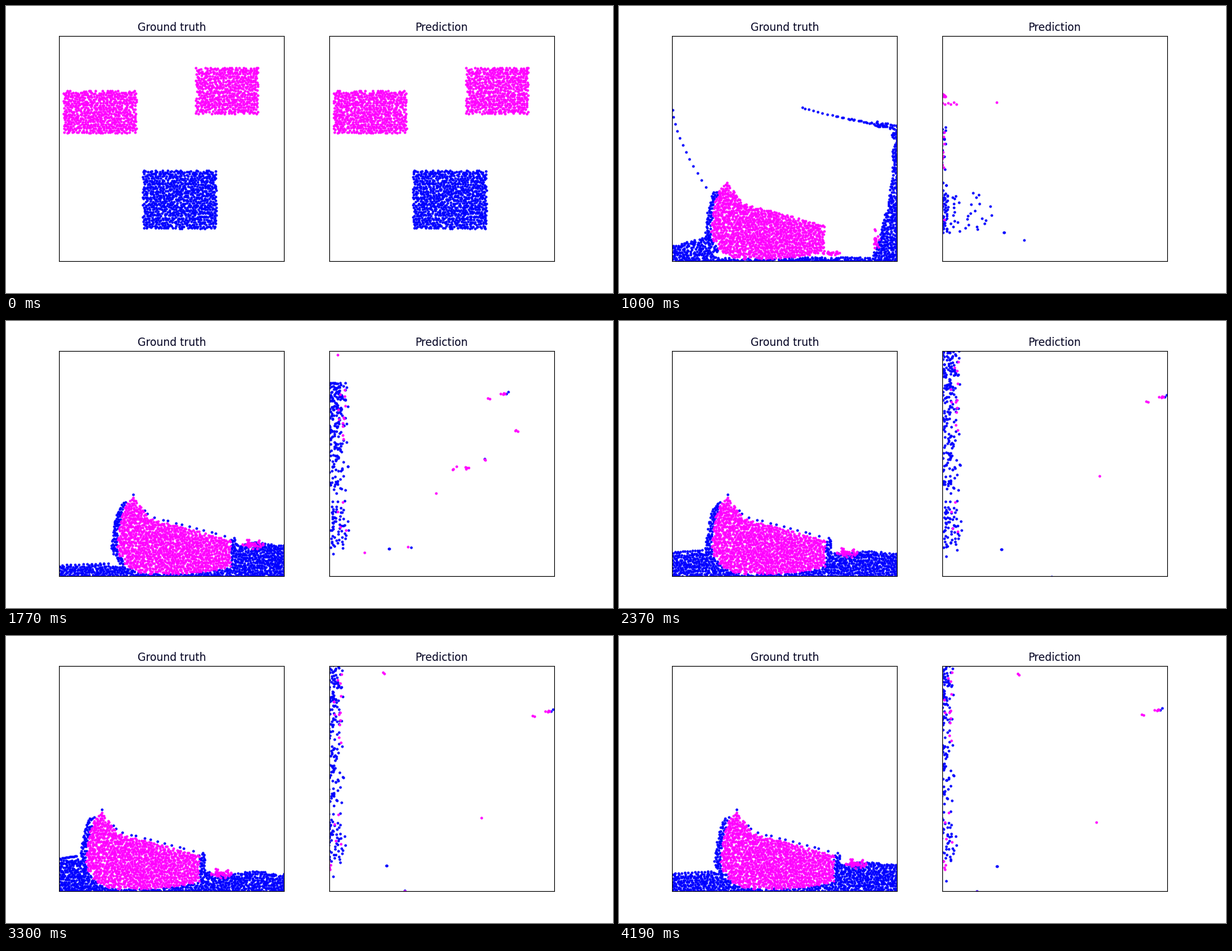
A matplotlib script that plays this animation: 950 by 450 pixels, repeating every 4230 ms.

```python
import numpy as np
import matplotlib.pyplot as plt
from matplotlib.animation import FuncAnimation

W, H, DPI = 950, 450, 100
LOOP, STEP = 4230, 30
BLUE, PINK, INK = "#0000ff", "#ff00ff", "#000020"
LEFT, TOP, WIDE, TALL = 83.2, 47.4, 352.27, 352.6
GAP = 422.7                 # distance between the two panels
WALL = LEFT + GAP           # left wall of the second panel
CALM = [1400, 1770, 2370, 2850, 3300, 3750, 4190]

rng = np.random.default_rng(4)


# ---------- helpers ----------

def fill(n, inside):
    """n evenly scattered points of the first panel where inside(x, y) holds."""
    s = 6.0
    while True:
        gx, gy = np.meshgrid(np.arange(84, 436, s), np.arange(48, 401, s * 0.866))
        gx[1::2] += s / 2
        pts = np.c_[gx.ravel(), gy.ravel()]
        pts += rng.uniform(-0.28, 0.28, pts.shape) * s
        pts = pts[inside(*pts.T)]
        if len(pts) >= n:
            return rng.permutation(pts)[:n]
        s *= 0.98


def rect(x0, y0, x1, y1):
    return lambda x, y: (x > x0) & (x < x1) & (y > y0) & (y < y1)


def shift(pts, dx, dy=0):
    return np.asarray(pts, float) + (dx, dy)


def columns(p, k=28):
    rank = np.argsort(np.argsort(p[:, 0]))
    return np.lexsort((p[:, 1], rank * k // len(p)))


def match(p, q):
    """Reorder q so that each point stays near its place in p."""
    out = np.empty_like(q)
    out[columns(p)] = q[columns(q)]
    return out


def track(*keys):
    """Smooth path without overshoot through (time, points) keys."""
    times = np.array([k[0] for k in keys], float)
    P = np.stack([np.asarray(k[1], float) for k in keys])
    d = np.diff(P, axis=0) / np.diff(times)[:, None, None]
    M = np.concatenate([d[:1], np.zeros_like(d[1:]), d[-1:]])
    a, b = d[:-1], d[1:]
    same = a * b > 0
    M[1:-1] = np.where(same, 2 * a * b / np.where(same, a + b, 1), 0)

    def at(t):
        t = np.clip(t, times[0], times[-1])
        i = min(np.searchsorted(times, t, "right") - 1, len(times) - 2)
        h = times[i + 1] - times[i]
        s = (t - times[i]) / h
        return (P[i] * (1 + 2 * s) * (1 - s) ** 2 + M[i] * h * s * (1 - s) ** 2
                + P[i + 1] * s * s * (3 - 2 * s) + M[i + 1] * h * s * s * (s - 1))
    return at


def drift(pts, *moves):
    return track(*[(t, shift(pts, dx, dy)) for t, dx, dy in moves])


def cluster(n, x, y, sx, sy=1):
    return np.c_[rng.normal(x, sx, n), rng.normal(y, sy, n)]


# ---------- shapes in the first panel ----------

def sway(t):
    """Sideways swing of the floating pile."""
    return 30 * np.exp(-((t - 1700) / 3300) ** 2) * np.cos(2 * np.pi * (t - 1700) / 2700)


def pile_top(s):
    return 297 + 46 * s - 28 * np.exp(-((s - 0.14) / 0.09) ** 2) + 60 * np.exp(-s / 0.03)


def in_pile(x, y, x0=144, w=178, lift=0):
    s = (x - x0) / w
    c = np.clip(s, 0, 1)
    bottom = 397 - 0.4 * lift - 40 * np.exp(-c / 0.08) - (12 + lift) * c ** 4
    return (s > 0) & (s < 1) & (y > pile_top(c) - lift) & (y < bottom)


def landed(x, y):
    return in_pile(x, y, 106, 171, 16)


def left_rim(x, y):
    return in_pile(x + 9, y) & ~in_pile(x, y) & (x < 156) & (y > 285)


def impact(x, y):
    return y > 400 - 80 * np.exp(-((x - 272) / 70) ** 4)


def splash(x, y):
    u = x - 84
    top = (392 - 57 * np.exp(-u / 25) - 36 * np.exp(-((x - 325) / 60) ** 2)
           - 75 * np.exp((x - 435) / 4))
    jet = (u < 28) & (y > 256 + u) & (y < 284 + 1.2 * u)
    rim = landed(x + 8, y) & (x < 112) & (y > 290)
    return ((y > top) | jet | rim) & ~landed(x, y)


def curl(x, y):
    """Water that climbs the right wall and folds over."""
    level = np.where(x < 150, 376 - 0.25 * (x - 84), 394)
    wall = (y > 190) & (x > 428 - 33 * ((y - 230) / 165) ** 2)
    lip = (x > 340) & (abs(y - stream(x)) < 1 + (x > 400) * 3)
    return (y > level) & ~in_pile(x, y) | left_rim(x, y) | wall | lip


def stream(x):
    return 158 + 32 * np.clip((x - 283) / 150, 0, 1) ** 0.8


def levels(dx):
    return 362 + 0.7 * dx, 362 - 0.45 * dx


def pool(dx):
    def inside(x, y):
        left, right = levels(dx)
        wave = 2 * np.sin(x / 13)
        px = x - dx
        rim = left_rim(px, y) | in_pile(px - 9, y) & (px > 322)
        return ((y > np.where(px < 240, left, right) + wave) | rim) & ~in_pile(px, y)
    return inside


# ---------- first panel ----------

block_a = fill(600, rect(90, 132.5, 204.5, 199.5))
block_b = fill(560, rect(297, 96.5, 394.5, 169))
water = fill(840, rect(214, 257.5, 329.5, 349))


def swing(pts, sinks=False):
    """Keys for points carried by the pile, or by the pool beside it."""
    return [(t, shift(pts, sway(t), levels(sway(t))[1] if sinks else 0)) for t in CALM]


def fall(pts, vx):
    return [(0, pts), (120, shift(pts, 0.21 * vx, 25)), (250, shift(pts, 0.45 * vx, 70))]


def body_track():
    loose = block_b[40:]
    start = np.vstack([block_a, loose])
    falls = [(t, np.vstack([p, q])) for (t, p), (_, q)
             in zip(fall(block_a, 0), fall(loose, -118))]
    heap = match(start, fill(len(start), landed))
    pile = match(heap, fill(len(start), in_pile))
    return track(*falls, (510, heap), (1000, pile), *swing(pile))


def tail_track(pts, thrown, size):
    """Crumbs that break off the right end of the pile."""
    blob = np.clip(rng.normal(0, 0.5, pts.shape), -1, 1)
    return track(*fall(pts, -118), (510, blob * (22, 5) + (305, 359)),
                 (1000, blob * size + thrown), *swing(blob * (17, 7) + (355, 1), True))


def water_track():
    p = water[28:]
    keys = [(0, p), (120, shift(p, 0, 27))]
    shapes = [(250, impact), (510, splash), (1000, curl)]
    for t, inside in shapes + [(t, pool(sway(t))) for t in CALM]:
        p = match(p, fill(len(p), inside))
        keys.append((t, p))
    return track(*keys)


def drop_track():
    """Spray thrown up along the left wall."""
    p, u = water[:12], np.linspace(0, 1, 12)
    rest = [(t, np.c_[88 + (42 + sway(t)) * u, levels(sway(t))[0] - 3 * u]) for t in CALM]
    return track(*fall(p, -60)[:2], (510, np.c_[84 + 10 * u, 258 + 30 * u]),
                 (760, np.c_[85 + 18 * u, 50 + 200 * u]),
                 (1000, np.c_[84 + 53 * u ** 1.5, 168 + 118 * u]), *rest)


def rider_track():
    """Water drops that come to rest on top of the pile."""
    p, u = water[12:28], np.linspace(0, 1, 16)
    p = p[np.argsort(p[:, 0])]
    s = np.clip(0.08 + 0.94 * u + rng.normal(0, 0.015, 16), 0.07, 1.03)
    x = 284 + 120 * u ** 1.2
    return track(*fall(p, 60), (510, np.c_[434 - 4 * u, 318 + 70 * u]),
                 (1000, np.c_[x, stream(x)]),
                 *swing(np.c_[144 + 178 * s, pile_top(s) - 4]))


# ---------- second panel ----------

def block_water_track():
    """The block slides into the left wall and vanishes behind it."""
    p = shift(water, GAP)
    y = p[:, 1]
    u = (p[:, 0] - 637) / 115
    low = 292 + (y - 258) * 0.7
    dense = np.interp(u, [0, 0.47, 0.89, 1], [430, 506, 575, 645])
    sparse = np.interp(u, [0, 0.9, 0.97, 1], [250, 500, 516, 582])
    late = np.c_[np.interp(u, [0, 0.96, 1], [300, 498, 536]), low]
    return track((0, p), (510, np.c_[dense, y + u * (303 - y) * 0.1]),
                 (1000, np.c_[sparse, low]), (1770, late), (2370, late),
                 (3300, shift(late, -5)), (4190, shift(late, -8)))


def block_a_track():
    p = shift(block_a, GAP)
    layer = fill(50, lambda x, y: (x < 152) & (y < 263) & (y > 259 - 27 * np.exp((84 - x) / 25)))
    end = np.vstack([match(p[:50], shift(layer, GAP)), shift(p[50:], -190, 75)])
    return drift_out(p, end, shift(end, -72, -10))


def block_b_track():
    p = shift(block_b, GAP)
    line = np.c_[np.linspace(531, 567, 9), rng.normal(148.5, 1.5, 9)]
    clump = shift(fill(90, lambda x, y: (y > 109 + 0.75 * (x - 84)) & (y < 132)), GAP)
    gone = shift(p[99:], -320)
    end = np.vstack([line, clump, gone])
    thin = np.vstack([shift(line, -40, 4), (clump - (515, 122)) * 0.4 + (502, 138), gone])
    return drift_out(p, end, thin)


def drift_out(start, end, thin):
    return track((0, start), (510, end), (1000, thin), (1500, shift(thin, -80)))


def column_track(n, offset):
    """Points that hang along the left wall and slowly leak out."""
    rows = 52 + 300 * np.linspace(0, 1, 18) ** 1.2
    odds = np.linspace(3, 1, 18)
    y = rng.choice(rows, n, p=odds / odds.sum()) + rng.normal(0, 6, n)
    x = WALL + 1 + offset
    early = np.interp(y, [48, 360], [190, 350])
    risen = np.interp(y, [48, 210, 360], [97, 213, 357])
    p = np.c_[x, y]
    return track((600, np.c_[x - 60, early]), (1000, np.c_[x - 21, early]),
                 (1770, np.c_[x + rng.normal(0, 1.5, n), risen]), (2370, p),
                 (3300, shift(p, -6, -4)), (4190, shift(p, -10, -7)))


# thrown off the wall: one swarm ends at the right, the other sinks to the floor
TO_RIGHT = [(1050, -290, 70), (1400, -90, 25), (1770, 0, 0), (2370, 71, 5),
            (3300, 70, 4), (4190, 64, 2)]
TO_FLOOR = [(1050, -256, -60), (1400, -100, -30), (1770, 0, 0), (2370, -72, 185),
            (3300, -125, 183), (4190, -190, 184)]


def flung(x, y, end):
    """A lone point that leaves the wall and drops out of the panel."""
    return track((1100, [(495, y)]), (1770, [(x, y)]), (2370, [(x + 15, end)]))


truth_blue = [water_track(), drop_track(), rider_track()]
truth_pink = [body_track(), tail_track(block_b[:20], (402, 368), (5, 18)),
              tail_track(block_b[20:40], (332, 387), (14, 3))]

pred_blue = [
    block_water_track(),
    column_track(230, 28 * rng.beta(1.1, 1.8, 230)),
    drift(cluster(2, 783, 112, 3), *TO_RIGHT),
    drift(cluster(1, 748, 217, 1), *TO_FLOOR),
    drift([(598, 358), (599, 358)], (0, 148, -28), (510, 42, -18), (1000, 4, -3),
          (2370, 0, 0), (4190, -7, 3)),
    track((0, [(750, 349)]), (510, [(653, 350)]), (1000, [(634, 367)]),
          (1770, [(634, 355)]), (2370, [(640, 412)])),
    track((1100, [(495, 362)]), (1770, [(512, 365)]), (4190, [(512, 384)])),
]
pred_pink = [
    block_a_track(), block_b_track(),
    column_track(16, rng.uniform(12, 25, 16)),
    drift(np.vstack([cluster(5, 782, 114, 5), cluster(2, 755, 121.5, 1.5, 0.5)]), *TO_RIGHT),
    drift(np.vstack([cluster(2, 699, 232, 1), cluster(5, 716, 230, 5),
                     cluster(2, 750, 218, 4)]), *TO_FLOOR),
    drift(cluster(3, 799, 172, 1), (1050, -310, 40), (1400, -110, 10), (1770, 0, 0),
          (2370, 90, 0)),
    track((0, [(800, 130)]), (510, [(589, 147)]), (1000, [(591, 151)]),
          (1770, [(673, 270)]), (2370, [(752, 243)]), (3300, [(744, 285)]),
          (4190, [(747, 292)])),
    flung(519, 53, 30), flung(561, 363, 412), flung(629, 354, 412),
    drift([(590, 57), (592, 59)], (1900, -95, -3), (2370, -62, -14), (3300, 0, 0),
          (4190, 35, 2)),
    drift(cluster(4, 511, 353, 2, 7), (2600, -20, 0), (3300, -3, 0), (4190, 0, 0)),
]

# ---------- drawing ----------

fig = plt.figure(figsize=(W / DPI, H / DPI), dpi=DPI, facecolor="white")


def panel(x, title):
    ax = fig.add_axes([x / W, (H - TOP - TALL) / H, WIDE / W, TALL / H])
    ax.set(xlim=(x, x + WIDE), ylim=(TOP + TALL, TOP), xticks=[], yticks=[])
    ax.set_title(title, fontsize=12, color=INK)
    return [ax.plot([], [], "o", ms=2, color=c)[0] for c in (BLUE, PINK)]


truth_dots = panel(LEFT, "Ground truth")
pred_dots = panel(WALL, "Prediction")


def draw(i):
    t = i * STEP
    for dots, tracks in zip(truth_dots, (truth_blue, truth_pink)):
        x, y = np.vstack([f(t) for f in tracks]).T
        dots.set_data(np.clip(x, 84, 435), np.minimum(y, 400))
    for dots, tracks in zip(pred_dots, (pred_blue, pred_pink)):
        dots.set_data(*np.vstack([f(t) for f in tracks]).T)
    return truth_dots + pred_dots


anim = FuncAnimation(fig, draw, frames=LOOP // STEP, interval=STEP,
                     repeat=True, repeat_delay=0)
plt.show()
```
